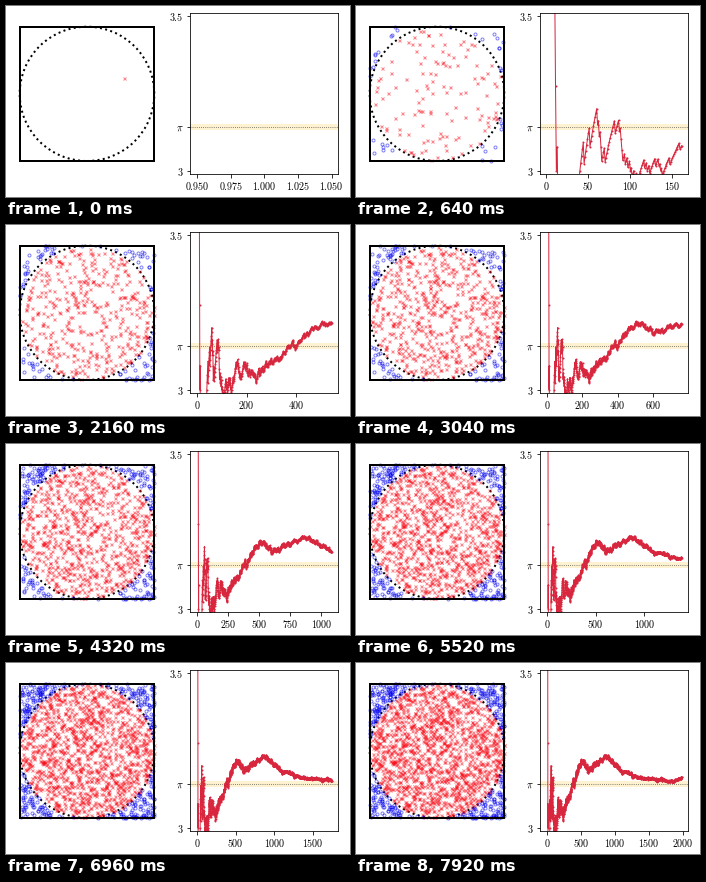
A matplotlib script that plays this animation: 344x191 px, repeating every 8000 ms.

```python
import numpy as np
import matplotlib.pyplot as plt
from matplotlib.animation import FuncAnimation
from matplotlib.patches import Circle, Rectangle
from matplotlib.ticker import MaxNLocator

WIDTH, HEIGHT, DPI = 344, 191, 100
PX = 72 / DPI  # points per pixel
FRAMES, INTERVAL, PER_FRAME = 100, 80, 20
TOTAL = PER_FRAME * (FRAMES - 1) + 1
BLOCK = 30  # points drawn at random between two fixed hit counts

# Key points of the estimate: (number of points, value).
COURSE = [
    (9, 4), (12, 3), (24, 2.7), (39, 2.97), (60, 3.17), (105, 2.97),
    (160, 3.08), (250, 3.05), (437, 3.175), (510, 3.214), (594, 3.187),
    (865, 3.232), (1081, 3.184), (1335, 3.163), (1860, 3.149), (1981, 3.163),
]


def draw_hits(rng):
    """Random hits and misses whose running estimate follows the course."""
    keys, values = zip(*COURSE)
    stations = sorted({*keys, *range(keys[5] + BLOCK, TOTAL, BLOCK)})
    hit = np.zeros(TOTAL, bool)
    done = hits = 0
    for n in stations:
        goal = round(n * np.interp(n, keys, values) / 4)
        gain = int(np.clip(goal - hits, 0, n - done))
        hit[done:n] = rng.permutation(np.arange(n - done) < gain)
        done, hits = n, hits + gain
    return hit


def draw_points(rng, hit):
    """Uniform points, inside the circle for a hit and outside for a miss."""
    pool = rng.random((2, 8 * TOTAL))
    inside = np.hypot(*(pool - 0.5)) <= 0.5
    points = np.empty((2, TOTAL))
    for kind in (True, False):
        points[:, hit == kind] = pool[:, inside == kind][:, :np.sum(hit == kind)]
    points[:, 0] = 0.774, 0.615
    return points


rng = np.random.default_rng(42)
hit = draw_hits(rng)
xs, ys = draw_points(rng, hit)
counts = np.arange(1, TOTAL + 1)
estimate = 4 * np.cumsum(hit) / counts

plt.rcParams.update({
    "mathtext.fontset": "cm",
    "font.size": 10 * PX,
    "axes.linewidth": 0.8 * PX,
})
fig = plt.figure(figsize=(WIDTH / DPI, HEIGHT / DPI), dpi=DPI, facecolor="white")


def add_axes(left, top, right, bottom):
    return fig.add_axes([left / WIDTH, 1 - bottom / HEIGHT,
                         (right - left) / WIDTH, (bottom - top) / HEIGHT])


board = add_axes(13.7, 20.7, 148.3, 155)
board.set(xlim=(0, 1), ylim=(0, 1))
board.axis("off")
board.add_patch(Circle((0.5, 0.5), 0.5, fill=False, ls=":", lw=2 * PX,
                       clip_on=False, zorder=1))
board.add_patch(Rectangle((0, 0), 1, 1, fill=False, lw=2 * PX,
                          clip_on=False, zorder=4))


def scatter_line(marker, color):
    return board.plot([], [], marker, ms=3 * PX, mew=1 * PX, mfc="none",
                      mec=color, alpha=0.5, clip_on=False, zorder=3)[0]


crosses = scatter_line("x", "#f80c18")
rings = scatter_line("o", "#0000f0")

chart = add_axes(184.4, 6.7, 332.3, 167.7)
chart.set_ylim(2.99, 3.51)
chart.set_yticks([3, np.pi, 3.5], ["$3$", r"$\pi$", "$3.5$"])
chart.tick_params(length=3.5 * PX, width=0.8 * PX, pad=3.5 * PX)
chart.tick_params(axis="x", pad=2.8 * PX)
chart.xaxis.set_major_locator(MaxNLocator(5, steps=[1, 2, 2.5, 5, 10]))
chart.axhspan(np.pi - 0.01, np.pi + 0.01, color="#fff2d0", lw=0)
chart.axhline(np.pi, color="0.3", ls=":", lw=0.8 * PX)
curve, = chart.plot([], [], "o-", color="#d7263d", lw=1 * PX, ms=2 * PX, mew=0)


def update(frame):
    n = PER_FRAME * frame + 1
    shown = hit[:n]
    crosses.set_data(xs[:n][shown], ys[:n][shown])
    rings.set_data(xs[:n][~shown], ys[:n][~shown])
    curve.set_data(counts[:n], estimate[:n])
    margin = 0.05 * (n - 1) or 0.055
    chart.set_xlim(1 - margin, n + margin)
    digits = 3 if n == 1 else 0
    chart.xaxis.set_major_formatter(lambda v, _: f"${v:.{digits}f}$")
    return crosses, rings, curve


anim = FuncAnimation(fig, update, frames=FRAMES, interval=INTERVAL,
                     repeat=True, repeat_delay=0, blit=False)
plt.show()
```
